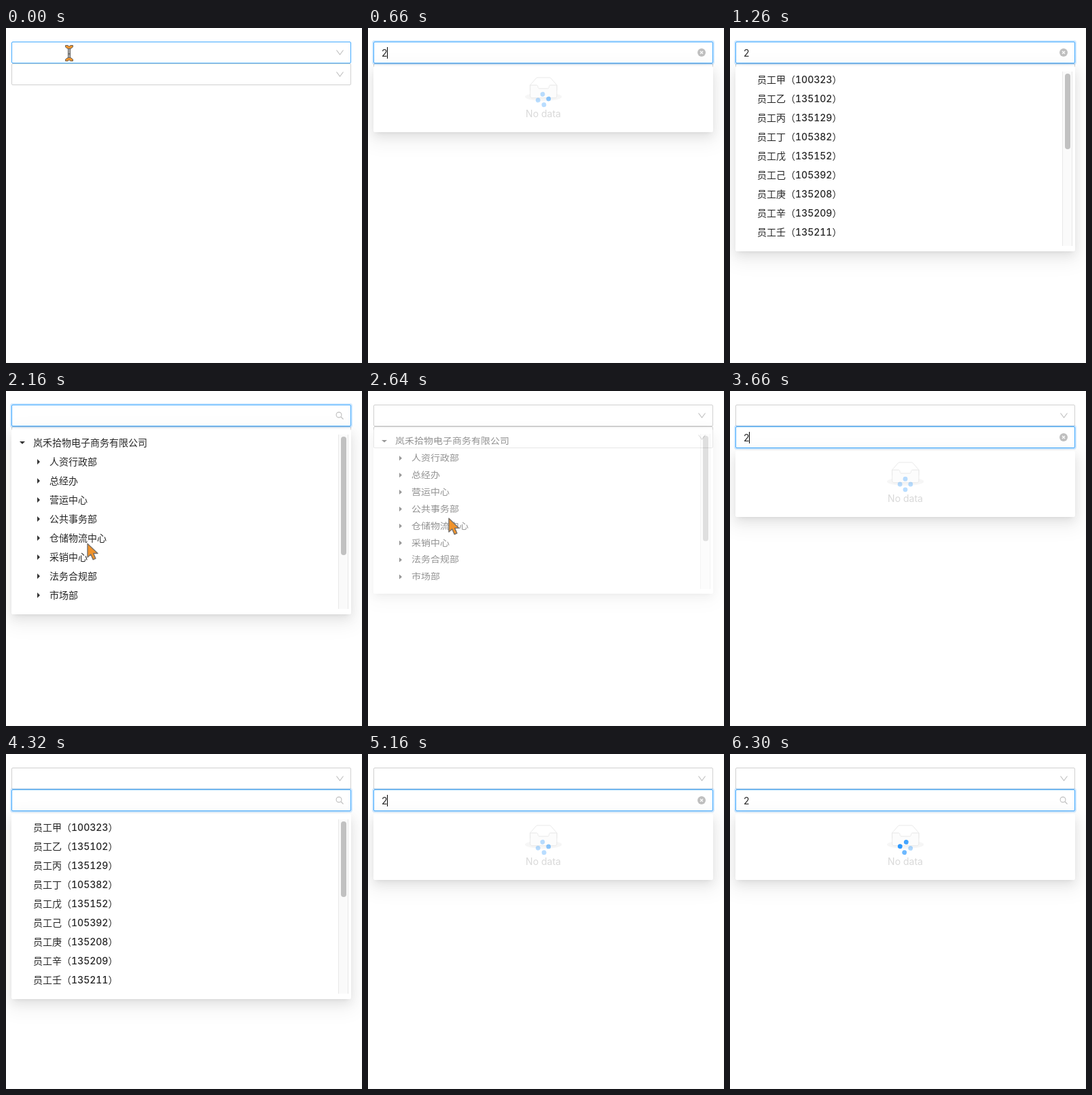
An HTML page that plays this animation: 524x492 px, repeating every 6360 ms.

```html
<!DOCTYPE html>
<html lang="zh-CN">
<head>
<meta charset="utf-8">
<style>
  html, body { margin: 0; width: 100%; height: 100%; overflow: hidden; background: #fff; }
  #stage {
    position: relative; width: 524px; height: 492px; overflow: hidden;
    font: 14px/24px Inter, "Noto Sans CJK SC", "Noto Sans CJK", sans-serif;
    color: rgba(0, 0, 0, .85); box-shadow: inset -1px -1px #f9f9f9;
  }
  #stage * { box-sizing: border-box; }
  #stage div, #stage svg { position: absolute; }
  .field {
    left: 8px; width: 500px; height: 32px; padding-left: 11px; line-height: 32px;
    background: #fff; border: 1px solid #d0d0d0; border-radius: 2px;
  }
  .field.hover { border-color: #40a9ff; z-index: 1; }
  .field.focus { border-color: #40a9ff; box-shadow: 0 0 0 2px rgba(24, 144, 255, .2); z-index: 2; }
  .caret { left: 19px; top: 7px; width: 1px; height: 17px; background: #000; }
  .icon { left: 476px; top: 9px; }
  .drop {
    left: 8px; width: 500px; z-index: 3; background: #fff; border-radius: 2px;
    transform-origin: 0 0;
    box-shadow: 0 3px 6px -4px rgba(0, 0, 0, .12), 0 6px 16px rgba(0, 0, 0, .08),
      0 9px 28px 8px rgba(0, 0, 0, .05);
  }
  .panel { inset: 0; }
  .row { white-space: nowrap; font-variant-numeric: tabular-nums; }
  .list .row { font-weight: 500; }
  .arrow { top: 10px; }
  .track {
    left: 481px; top: 8px; width: 15px; height: 256px;
    background: #fafafa; border: solid #e8e8e8; border-width: 0 1px;
  }
  .thumb { left: 3px; top: 3px; width: 8px; border-radius: 4px; background: #c1c1c1; }
  .empty { inset: 0; opacity: .55; }
  .empty svg { left: 222.7px; top: 16px; }
  .empty div { top: 59px; width: 100%; line-height: 22px; text-align: center; color: rgba(0, 0, 0, .28); }
  .spin { left: 238px; top: 36.5px; }
  .pointer { z-index: 9; left: 0; top: 0; overflow: visible; }
</style>
</head>
<body>
<div id="stage"></div>
<script>
const LOOP = 6360, STEP = 60;
const SPIN_RATE = 3.21;
const stage = document.getElementById('stage');

const departments = ['岚禾拾物电子商务有限公司', '人资行政部', '总经办', '营运中心', '公共事务部',
  '仓储物流中心', '采销中心', '法务合规部', '市场部'];
const staffIds = [100323, 135102, 135129, 105382, 135152, 105392, 135208, 135209, 135211];
const staff = staffIds.map((id, i) => `员工${'甲乙丙丁戊己庚辛壬'[i]}（${id}）`);

const icons = {
  down: '<path d="M1.5 2.5 6.5 9 11.5 2.5" fill="none" stroke="#bfbfbf" stroke-width="1.1"/>',
  clear: '<circle cx="6" cy="6" r="6" fill="#bfbfbf"/><path d="M4 4 8 8M8 4 4 8" stroke="#fff" stroke-width="1.1"/>',
  search: '<g fill="none" stroke="#bfbfbf" stroke-width="1.1"><circle cx="5" cy="5" r="3.9"/><path d="M8 8 11.5 11.5"/></g>'
};

const emptyArt = `<svg width="54.6" height="35" viewBox="0 0 64 41"><g transform="translate(0 1)">
  <ellipse fill="#f0f0f0" cx="32" cy="33" rx="32" ry="7"/><g stroke="#d0d0d0" fill="none">
  <path d="M55 12.8 44.9 1.3C44.4.5 43.7 0 42.9 0H21.1c-.8 0-1.5.5-2 1.3L9 12.8V22h46z" fill="#fff"/>
  <path d="M41.6 15.9c0-1.6 1-2.9 2.2-2.9H55v18.1c0 2.2-1.3 3.9-2.9 3.9H12c-1.7 0-3-1.7-3-3.9V13h11.2
    c1.2 0 2.2 1.3 2.2 2.9 0 1.6 1 2.9 2.2 2.9h14.8c1.2 0 2.2-1.3 2.2-2.9z" fill="#fafafa"/></g></g></svg>`;

function add(parent, className, html = '', style = '') {
  const el = document.createElement('div');
  el.className = className;
  el.innerHTML = html;
  el.style.cssText = style;
  parent.append(el);
  return el;
}

const show = (el, on) => { el.style.display = on ? '' : 'none'; };

function addPanel(drop, className, labels, thumbHeight) {
  const panel = add(drop, 'panel ' + className);
  labels.forEach((label, i) => {
    const top = 8 + i * 28;
    const nested = className === 'tree' && i > 0;
    add(panel, 'row', label, `left:${nested ? 56 : 32}px;top:${top}px`);
    if (className === 'tree') {
      const shape = nested ? 'M2 0 6 4 2 8z' : 'M0 2H8L4 6z';
      add(panel, '', `<svg class="arrow" width="8" height="8"><path d="${shape}" fill="#333"/></svg>`,
        `left:${nested ? 36 : 12}px;top:${top - 2}px`);
    }
  });
  add(panel, 'track', `<div class="thumb" style="height:${thumbHeight}px"></div>`);
  return panel;
}

function createSelect(top) {
  const field = add(stage, 'field', '', `top:${top}px`);
  const text = add(field, '', '2');
  const caret = add(field, 'caret');
  const iconEls = {};
  for (const name in icons) {
    iconEls[name] = add(field, 'icon', `<svg width="13" height="13">${icons[name]}</svg>`);
  }
  const drop = add(stage, 'drop', '', `top:${top + 36}px`);
  const panels = {
    tree: addPanel(drop, 'tree', departments, 174),
    list: addPanel(drop, 'list', staff, 111),
    loading: add(drop, 'panel', `<div class="empty">${emptyArt}<div>No data</div></div>
      <svg class="spin" width="24" height="24"><g fill="#1890ff"></g></svg>`)
  };
  const dots = panels.loading.querySelector('.spin g');
  for (let i = 0; i < 4; i++) {
    dots.innerHTML += `<circle cx="12" cy="4.2" r="3.4" transform="rotate(${i * 90} 12 12)"/>`;
  }

  return function render(s) {
    field.className = 'field' + (s.focus ? ' focus' : s.hover ? ' hover' : '');
    show(text, s.typed);
    show(caret, s.caret);
    for (const name in iconEls) show(iconEls[name], name === s.icon);
    show(drop, s.panel);
    if (!s.panel) return;
    for (const name in panels) show(panels[name], name === s.panel);
    drop.style.height = (s.panel === 'loading' ? 97 : 272) + 'px';
    drop.style.transform = s.scale === 1 ? '' : `scaleY(${s.scale})`;
    drop.style.opacity = s.alpha;
    if (s.panel === 'loading') spin(dots, s.spinTime);
  };
}

function spin(dots, seconds) {
  dots.setAttribute('transform', `rotate(${seconds * 300} 12 12)`);
  [...dots.children].forEach((dot, i) => {
    const age = Math.max(0, seconds - i * .4) % 2;
    dot.setAttribute('opacity', .3 + .7 * (age < 1 ? age : 2 - age));
  });
}

// Each search: when it is typed, when the spinner began, when results come and when it is erased.
const first = {
  focus: 120, open: 180, close: 2580, closed: 2700,
  searches: [{ typed: 600, spin: 574, found: 1260, erased: 1440 }]
};
const second = {
  focus: 3240, open: 3300, close: Infinity, closed: Infinity,
  searches: [
    { typed: 3660, spin: 3660, found: 3960, erased: 4320 },
    { typed: 5100, spin: 5075, found: Infinity, erased: Infinity, leave: 6120 }
  ]
};

function selectState(plan, t, hover) {
  const focus = t >= plan.focus && t < plan.close;
  const s = { focus, hover, icon: focus ? 'search' : 'down', panel: null, scale: 1, alpha: 1 };
  if (t < plan.open || t >= plan.closed) return s;
  s.panel = 'tree';
  if (t < plan.open + 120) {
    const p = (t - plan.open) / STEP;
    s.scale = .83 + p * .067;
    s.alpha = .3 + p * .35;
  }
  if (t >= plan.close) {
    const p = (t - plan.close) / STEP;
    s.scale = .965 - p * .076;
    s.alpha = .85 - p * .35;
  }
  for (const q of plan.searches) {
    if (t < q.typed || t >= q.erased + STEP) continue;
    const loading = t < q.found;
    s.typed = t < q.erased;
    s.panel = loading ? 'loading' : 'list';
    s.icon = s.typed && !(t >= q.leave) ? 'clear' : 'search';
    s.caret = loading && Math.floor((t - q.typed) / 160) % 2 === 0;
    s.spinTime = Math.max(0, (t - q.spin) / 1000 * SPIN_RATE);
  }
  return s;
}

// Pointer trips as [time, x, y]; hidden between them.
const trips = [
  [[0, 93, 37], [120, 93, 37], [540, 95, 38]],
  [[1740, 93, 40], [1860, 112, 150], [1920, 119, 189], [2100, 119, 189], [2460, 125, 400],
    [2520, 125, 400], [2640, 119, 187], [2760, 112, 76], [3240, 95, 68], [3600, 95, 68]],
  [[4800, 95, 68], [4920, 118, 382], [5040, 95, 68]]
];

function pointerAt(t) {
  const trip = trips.find(k => t >= k[0][0] && t <= k[k.length - 1][0]);
  if (!trip) return null;
  const i = Math.max(1, trip.findIndex(k => k[0] >= t));
  const [t0, x0, y0] = trip[i - 1], [t1, x1, y1] = trip[i];
  const p = (t - t0) / (t1 - t0);
  return { x: x0 + (x1 - x0) * p, y: y0 + (y1 - y0) * p };
}

function createPointer(paths) {
  const svg = document.createElementNS('http://www.w3.org/2000/svg', 'svg');
  svg.setAttribute('class', 'pointer');
  svg.setAttribute('width', 1);
  svg.setAttribute('height', 1);
  svg.innerHTML = paths;
  stage.append(svg);
  return svg;
}

const renderFirst = createSelect(20);
const renderSecond = createSelect(52);
const arrow = createPointer(`<path d="M0 0V20L4.8 15.8 8.2 23.5 12 21.8 8.7 14.4H15z"
  fill="#f0932b" stroke="#77716b" stroke-width="1.4" stroke-linejoin="round"/>`);
const beam = createPointer(`<g stroke="#666" stroke-linejoin="round">
  <path d="M-1.6-7H1.6V7H-1.6z" fill="#aaa"/>
  <path id="wing" d="M-5.5-11.5H-2L0-9.8 2-11.5H5.5V-9L2-6.5H-2L-5.5-9z" fill="#f0932b"/>
  <use href="#wing" transform="scale(1 -1)"/><path d="M-2 1H2" stroke-width="1.5"/></g>`);

function frame(now) {
  const t = Math.floor(now % LOOP / STEP) * STEP;
  const mouse = pointerAt(t);
  const over = top => !!mouse && mouse.y >= top && mouse.y < top + 32;
  const onFirst = over(20);
  const onSecond = over(52) && (t >= plan2Free);
  renderFirst(selectState(first, t, onFirst));
  renderSecond(selectState(second, t, onSecond));
  show(beam, onFirst || onSecond);
  show(arrow, mouse && !onFirst && !onSecond);
  if (mouse) {
    const place = `translate(${mouse.x}px, ${mouse.y}px)`;
    beam.style.transform = place;
    arrow.style.transform = place;
  }
  requestAnimationFrame(frame);
}

// The second field is covered until the first dropdown has closed.
const plan2Free = first.closed;
const start = performance.now();
const tick = frame;
frame = now => tick(Math.max(0, now - start));
requestAnimationFrame(frame);
</script>
</body>
</html>
```
